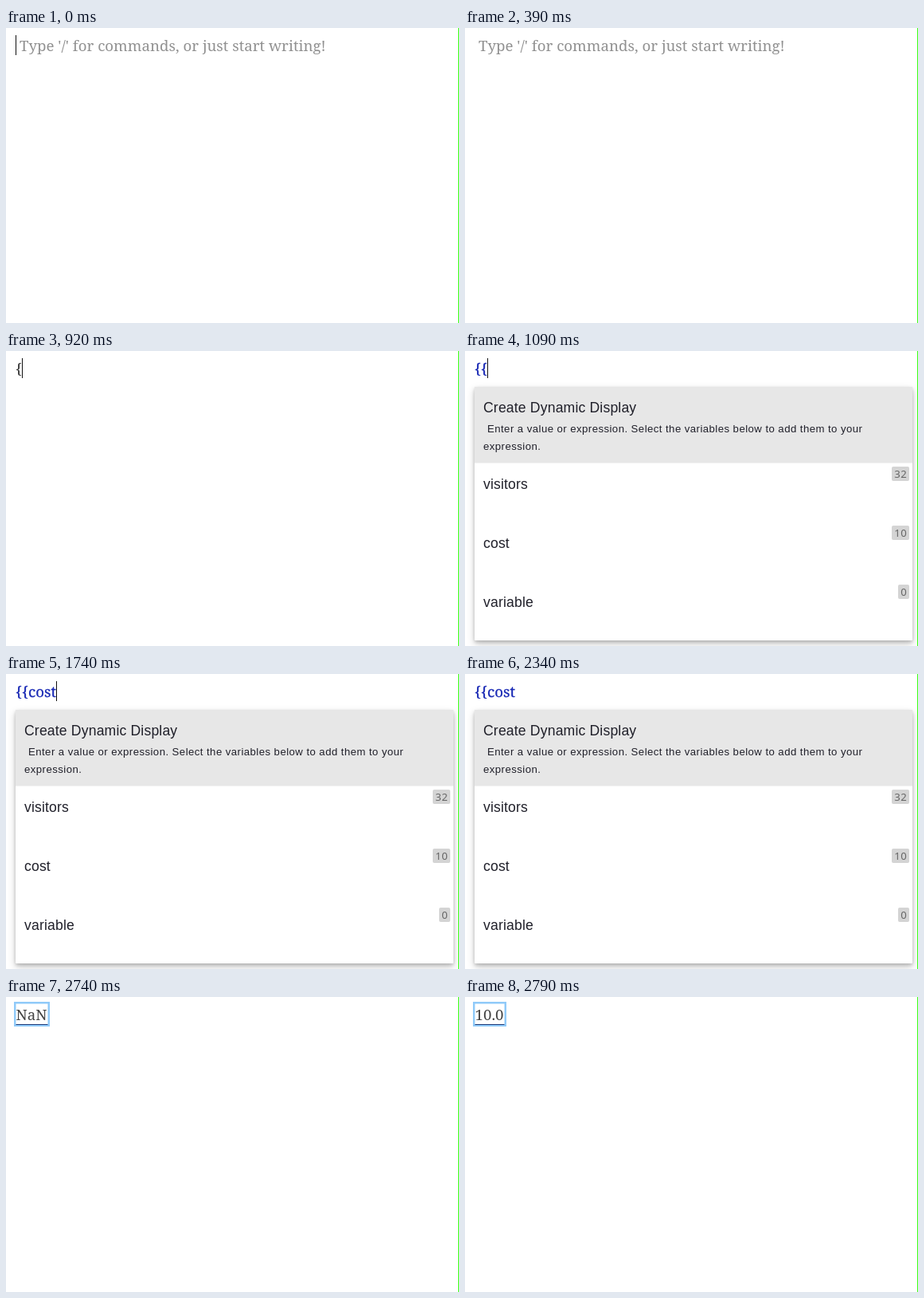
An HTML page for the animation above (3.44 s loop, 569 px wide and 370 px high).

```html
<!DOCTYPE html>
<html lang="en">
<head>
<meta charset="utf-8">
<title>Dynamic display</title>
<style>
  html, body { margin: 0; width: 100%; height: 100%; overflow: hidden; background: #fff; }
  svg { display: block; width: 569px; height: 370px; }
  text { white-space: pre; }
  .serif { font: 18.7px "Noto Serif", serif; }
  .title { font: 17.6px "Liberation Sans", Arial, sans-serif; letter-spacing: .165px; fill: #20202a; }
  .note { font: 13.2px "Liberation Sans", Arial, sans-serif; letter-spacing: .44px; fill: #20202a; }
  .badge { font: 13.2px "Noto Sans", sans-serif; letter-spacing: .44px; fill: #666; }
  .panel {
    filter: drop-shadow(0 2px 2px rgba(0, 0, 0, .18))
            drop-shadow(0 4px 5px rgba(0, 0, 0, .2));
  }
</style>
</head>
<body>
<svg viewBox="0 0 569 370">
  <rect width="569" height="370" fill="#fff"/>
  <g id="menu">
    <rect class="panel" x="12" y="45" width="550" height="318" rx="1" fill="#fff"/>
    <rect x="12" y="45" width="550" height="95.5" fill="#e7e7e7"/>
    <text class="title" x="23" y="77">Create Dynamic Display</text>
    <text class="note" x="28" y="102">Enter a value or expression. Select the variables below to add them to your</text>
    <text class="note" x="23" y="124">expression.</text>
    <g id="rows"></g>
  </g>
  <text id="hint" class="serif" x="17" y="29" fill="#919191">Type '/' for commands, or just start writing!</text>
  <text id="typed" class="serif" x="12" y="29"></text>
  <rect id="caret" y="9" width="1" height="25" fill="#111"/>
  <g id="result">
    <rect id="frame" x="11.25" y="7.25" height="28.5" fill="none" stroke="#90caf9" stroke-width="2.5"/>
    <rect id="line" x="12.5" y="34" height="1" fill="#1e3a78"/>
    <text id="value" class="serif" x="12.5" y="29" fill="#444"></text>
  </g>
  <rect x="568" width="1" height="370" fill="#3cff14"/>
</svg>
<script>
  const LOOP = 3440;
  const MENU_OPEN = 1090, MENU_CLOSE = 2740;
  const $ = id => document.getElementById(id);

  // Each step: start time, typed text, caret x (null while hidden)
  const steps = [
    [0, '', 12],
    [390, '', null],
    [920, '{', 20],
    [1090, '{{', 28],
    [1290, '{{c', 37],
    [1440, '{{co', 48],
    [1590, '{{cos', 56],
    [1740, '{{cost', 63],
    [2340, '{{cost', null],
    [2740, '', null]
  ];

  const variables = [['visitors', 32], ['cost', 10], ['variable', 0]];

  $('rows').innerHTML = variables.map(([name, value], i) => {
    const y = 145 + 74 * i;
    const width = 6 + 8 * String(value).length;
    const x = 558 - width;
    return `<text class="title" x="23" y="${y + 28}">${name}</text>
      <rect x="${x}" y="${y}" width="${width}" height="18" rx="2" fill="#d4d4d4"/>
      <text class="badge" x="${x + 3.2}" y="${y + 14}">${value}</text>`;
  }).join('');

  function show(id, on) {
    $(id).style.display = on ? '' : 'none';
  }

  function draw(t) {
    const [, text, caretX] = steps.filter(step => step[0] <= t).pop();
    const inMenu = t >= MENU_OPEN && t < MENU_CLOSE;
    const done = t >= MENU_CLOSE;

    show('hint', t < 920);
    show('menu', inMenu);
    show('result', done);
    show('caret', caretX !== null);
    if (caretX !== null) $('caret').setAttribute('x', caretX);

    const typed = $('typed');
    typed.textContent = text;
    typed.setAttribute('fill', inMenu ? '#1a2ab5' : '#333');
    typed.setAttribute('stroke', inMenu ? '#1a2ab5' : 'none');
    typed.setAttribute('stroke-width', .3);

    if (done) {
      const ready = t >= 2790;
      const width = ready ? 42 : 45;
      $('value').textContent = ready ? '10.0' : 'NaN';
      $('frame').setAttribute('width', width - 2.5);
      $('line').setAttribute('width', width - 5);
    }
  }

  const start = performance.now();
  function tick() {
    draw((performance.now() - start) % LOOP);
    requestAnimationFrame(tick);
  }
  draw(0);
  requestAnimationFrame(tick);
</script>
</body>
</html>
```
